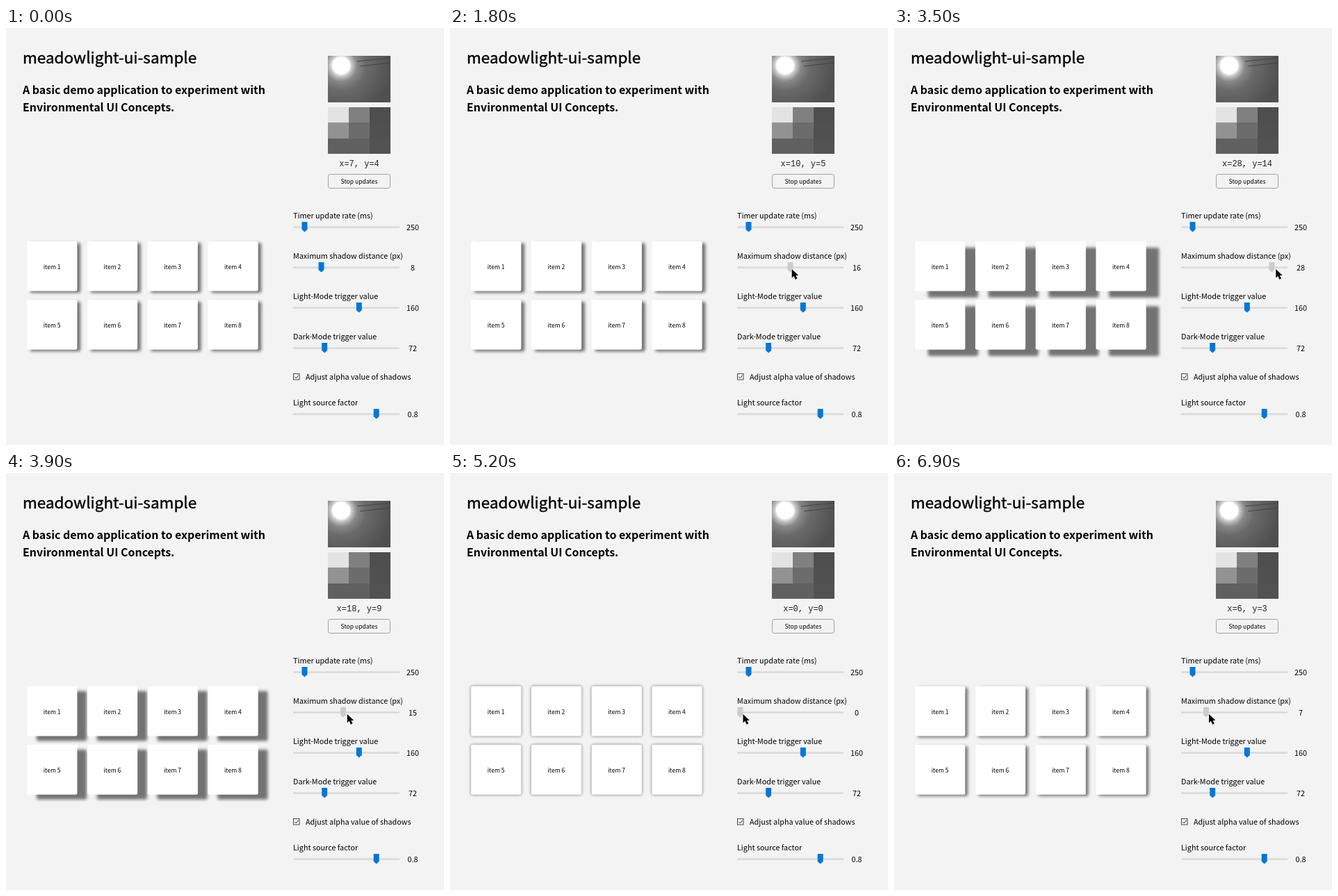
Write an HTML page that moves like this. It is 630 px wide and 600 px high and loops after 7000 ms.

```html
<!DOCTYPE html>
<html lang="en">
<head>
<meta charset="utf-8">
<title>Light-aware interface</title>
<style>
  html, body { margin: 0; width: 100%; height: 100%; overflow: hidden; background: #f3f3f3; }
  svg { display: block; width: 630px; height: 600px; }
  text { font: 10.8px "Noto Sans CJK JP", "Noto Sans CJK SC", "Noto Sans CJK", "Noto Sans", sans-serif; fill: #000; }
  text.title { font-size: 22.5px; stroke: #000; stroke-width: .4px; }
  text.lead { font-size: 15.95px; font-weight: 700; }
  text.small { font-size: 8.6px; }
  text.mono { font: 12px "Liberation Mono", monospace; fill: #222; }
  .mid { text-anchor: middle; }
</style>
</head>
<body>
<svg id="stage" viewBox="0 0 630 600">
  <defs>
    <radialGradient id="glow" gradientUnits="userSpaceOnUse" cx="482" cy="54" r="72">
      <stop offset=".16" stop-color="#fff"/>
      <stop offset=".22" stop-color="#c4c4c4"/>
      <stop offset=".32" stop-color="#888"/>
      <stop offset=".5" stop-color="#6a6a6a"/>
      <stop offset="1" stop-color="#505050"/>
    </radialGradient>
    <filter id="soft" filterUnits="userSpaceOnUse" x="0" y="280" width="420" height="220">
      <feGaussianBlur stdDeviation="2"/>
    </filter>
  </defs>
</svg>
<script>
const LOOP = 7000, FRAME = 100, TICK = 250, TICK_PHASE = 5;
const ENTER_AT = 100, HOVER_AT = 700, PRESS_AT = 1500;
const SHADOW_SCALE = 2 / 3, LIGHT_X = 0.875, LIGHT_Y = 0.45;
const BLUE = '#0078d7';

// Turning points of the drag: [time, slider value]
const dragPath = [
  [0, 8], [1724, 8], [1934, 29], [2600, 29], [2900, 32],
  [3389, 32], [4374, 0], [5300, 0], [6700, 7], [LOOP, 7]
];

const stage = document.getElementById('stage');

function add(tag, attrs, parent = stage) {
  const el = document.createElementNS('http://www.w3.org/2000/svg', tag);
  for (const name in attrs) el.setAttribute(name, attrs[name]);
  parent.appendChild(el);
  return el;
}

function label(x, y, content, cls = '') {
  const el = add('text', { x, y, class: cls });
  el.textContent = content;
  return el;
}

const thumbX = (value, max) => 417.5 + 144 * value / max;

function slider(name, y, value, max) {
  label(413, y - 12.5, name);
  add('rect', { x: 413, y: y - 1.2, width: 153, height: 2.6, fill: '#dadada' });
  const thumb = add('path', { d: 'M-4 -7.5H4V3.5L0 7L-4 3.5Z', fill: BLUE });
  const number = label(585, y + 4.5, '', 'mid');
  const set = v => {
    thumb.setAttribute('transform', `translate(${thumbX(v, max)} ${y})`);
    number.textContent = v;
  };
  set(value);
  return { thumb, set, max };
}

// Headings
label(24, 51, 'meadowlight-ui-sample', 'title');
label(24, 95, 'A basic demo application to experiment with', 'lead');
label(24, 120, 'Environmental UI Concepts.', 'lead');

// Camera view and its coarse brightness grid
add('rect', { x: 463, y: 40, width: 90, height: 67, fill: 'url(#glow)' });
add('ellipse', { cx: 482, cy: 54, rx: 13, ry: 11.5, fill: '#fff', transform: 'rotate(20 482 54)' });
add('path', { d: 'M505 48L553 43M509 55L553 50', stroke: '#404040', 'stroke-width': 0.9 });
'e3 80 4e 92 6c 50 60 60 52'.split(' ').forEach((grey, i) => add('rect', {
  x: 463 + 30 * (i % 3), y: 113.5 + 22.5 * Math.floor(i / 3),
  width: 30, height: 22.5, fill: '#' + grey.repeat(3), 'shape-rendering': 'crispEdges'
}));
const readout = label(508, 199, '', 'mono mid');
add('rect', { x: 463.5, y: 210.5, width: 89, height: 20, rx: 3, fill: '#f3f3f3', stroke: '#a0a0a0' });
label(508, 224, 'Stop updates', 'small mid');

// Cards over one shared shadow layer
const shadows = add('g', { filter: 'url(#soft)', opacity: 0.52 });
const shadowShift = add('g', {}, shadows);
for (let i = 0; i < 8; i++) {
  const x = 30.2 + 86.75 * (i % 4), y = 306.7 + 84.3 * Math.floor(i / 4);
  const box = { x, y, width: 72.2, height: 71.7, rx: 2.5 };
  add('rect', box, shadowShift);
  add('rect', { ...box, fill: '#fff' });
  label(x + 36, y + 40, 'item ' + (i + 1), 'small mid');
}

// Controls
slider('Timer update rate (ms)', 286.5, 250, 3000);
const distance = slider('Maximum shadow distance (px)', 344.5, 8, 32);
slider('Light-Mode trigger value', 402.5, 160, 255);
slider('Dark-Mode trigger value', 460.5, 72, 255);
slider('Light source factor', 555.5, 0.8, 1);
add('rect', { x: 413.5, y: 497.5, width: 8.5, height: 8.5, fill: '#f8f8f8', stroke: '#333', 'stroke-width': 0.9 });
add('path', { d: 'M415.2 501.7L417.2 503.8L420.8 499.6', fill: 'none', stroke: '#222' });
label(431, 506, 'Adjust alpha value of shadows');

const pointer = add('path', {
  d: 'M0 0V12.5L2.9 9.8L5 14.8L7.8 13.6L5.6 9H9.5Z',
  stroke: '#fff', 'stroke-width': 0.9, 'paint-order': 'stroke'
});

const mix = (a, b, p) => a + (b - a) * p;
const smooth = p => p * p * (3 - 2 * p);
const progress = (t, from, to) => Math.min(1, Math.max(0, (t - from) / (to - from)));

function dragAt(t) {
  const next = Math.max(1, dragPath.findIndex(([time]) => time > t));
  const [from, a] = dragPath[next - 1], [to, b] = dragPath[next];
  return mix(a, b, progress(t, from, to));
}

const lightAt = t => [LIGHT_X, LIGHT_Y].map(k => Math.round(Math.round(dragAt(t)) * k));

function draw(t) {
  const drag = dragAt(t);
  distance.set(Math.round(drag));
  distance.thumb.setAttribute('fill', t < HOVER_AT ? BLUE : t < PRESS_AT ? '#171717' : '#ccc');

  // The readout refreshes on each tick; the shadow eases towards it.
  const tick = Math.floor((t - TICK_PHASE) / TICK) * TICK + TICK_PHASE;
  const now = lightAt(tick), before = lightAt(tick - TICK);
  const p = smooth((t - tick) / TICK);
  const [dx, dy] = now.map((n, i) => mix(before[i], n, p) * SHADOW_SCALE);
  readout.textContent = `x=${now[0]}, y=${now[1]}`;
  shadowShift.setAttribute('transform', `translate(${dx} ${dy})`);

  // The pointer glides in from the corner, then holds the thumb.
  const enter = smooth(progress(t, ENTER_AT, HOVER_AT + FRAME));
  const x = mix(640, thumbX(drag, distance.max) + 4, enter), y = mix(606, 347, enter);
  pointer.setAttribute('transform', `translate(${x} ${y})`);
}

const start = performance.now();
function play() {
  const t = (performance.now() - start) % LOOP;
  draw(Math.floor(t / FRAME) * FRAME);
  requestAnimationFrame(play);
}
play();
</script>
</body>
</html>
```
